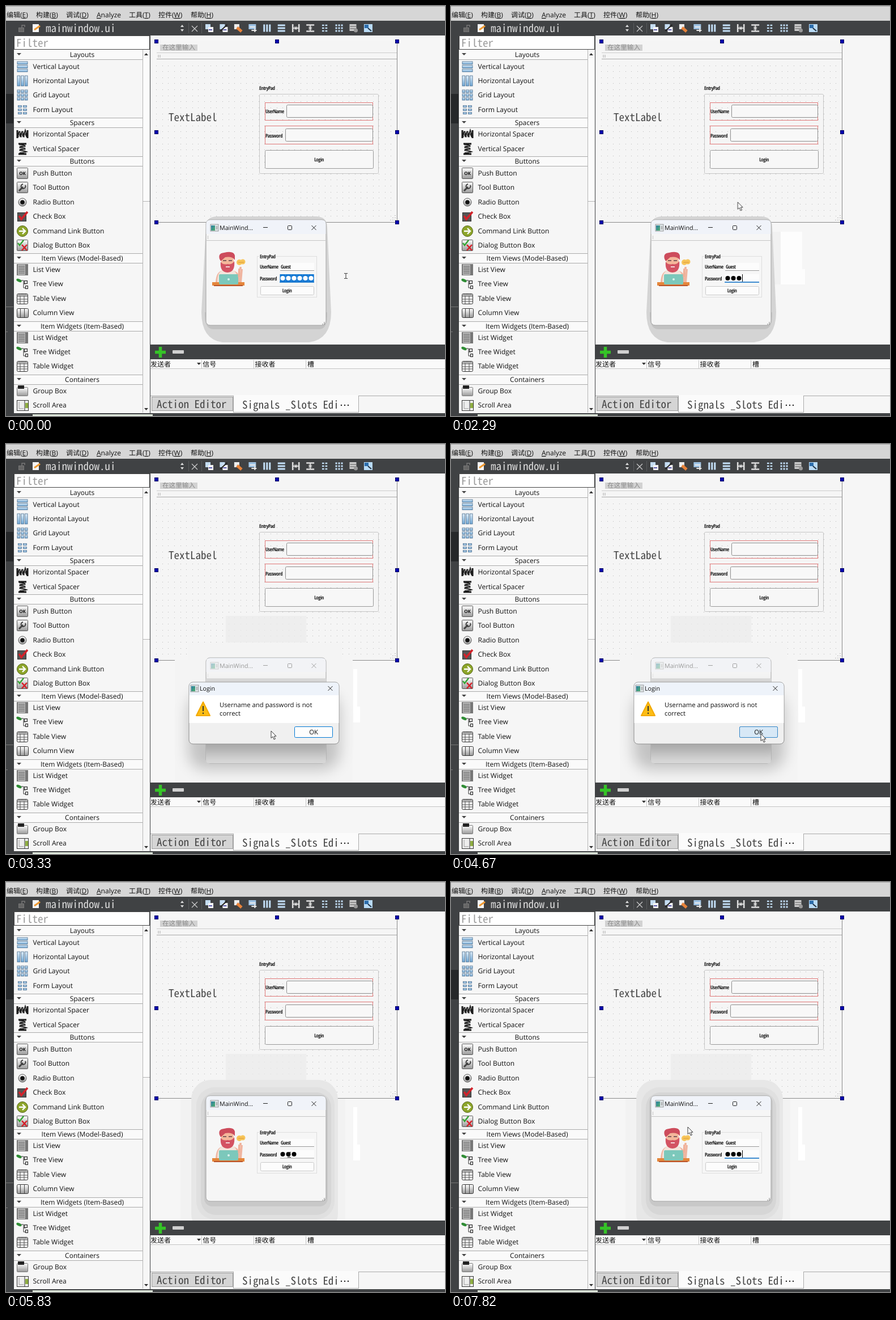
An HTML page that plays this animation: 775 by 723 pixels, repeating every 8000 ms.

```html
<!DOCTYPE html>
<html lang="zh">
<head>
<meta charset="utf-8">
<title>Login form demo</title>
<style>
html, body { margin: 0; width: 100%; height: 100%; overflow: hidden; background: #f6f6f6; }
svg { display: block; width: 775px; height: 723px; }
text { font: 12px "Open Sans", "Noto Sans CJK SC", "Noto Sans CJK", sans-serif; fill: #111; text-rendering: geometricPrecision; white-space: pre; }
text.mid { text-anchor: middle; }
text.mono { font: 19px "Noto Sans Mono CJK SC", "Liberation Mono", monospace; font-size-adjust: ch-width .5; fill: #444; }
text.narrow { font: 8px "Open Sans Condensed", "Noto Sans Condensed", "Liberation Sans Narrow", "Open Sans", Roboto, sans-serif; font-stretch: 62.5%; font-size-adjust: ch-width .524; letter-spacing: -.5px; fill: #222; }
text.title { font-size: 10.7px; }
text.message { font-size: 11.3px; }
.u { text-decoration: underline; }

.step, .ease { animation: 8s infinite; }
.step { animation-timing-function: step-end; }
.ease { animation-timing-function: linear; }
.all { animation-name: all; }
.caret { animation-name: caret; }
.dot1 { animation-name: dot1; }
.dot2 { animation-name: dot2; }
.dot3 { animation-name: dot3; }
.pick1 { animation-name: pick1; }
.pick2 { animation-name: pick2; }
.pick3 { animation-name: pick3; }
.focus { animation-name: focus; }
.hover { animation-name: hover; }
.default { animation-name: default-button; }
.tight { animation-name: tight; }
.soft { animation-name: soft; }
.dialog { animation-name: dialog; }
.popup { animation-name: popup; transform-origin: 455px 475px; }
.press { animation-name: press; }
.trail1 { animation-name: trail1; }
.trail2 { animation-name: trail2; }
.trail3 { animation-name: trail3; }
.trail4 { animation-name: trail4; }
.pointer { animation-name: pointer; }
.arrow { animation-name: arrow; }
.beam { animation-name: beam; }

@keyframes all { 0% { opacity: 1 } 5.25%, 100% { opacity: 0 } }
@keyframes caret {
  0% { opacity: 0 }
  5.25% { opacity: 1; transform: none }
  11.875% { opacity: 0 }
  12.875% { opacity: 1; transform: translateX(10px) }
  15.75% { opacity: 1; transform: translateX(20px) }
  18.25% { opacity: 1; transform: translateX(30px) }
  40% { opacity: 0 }
  82.875% { opacity: 1; transform: none }
  88.5% { opacity: 0 }
  92.875% { opacity: 1; transform: translateX(10px) }
  95.125% { opacity: 1; transform: translateX(20px) }
  97.75%, 100% { opacity: 1; transform: translateX(30px) }
}
@keyframes dot1 { 0%, 82.875% { opacity: 0 } 12.875%, 92.875%, 100% { opacity: 1 } }
@keyframes dot2 { 0%, 82.875% { opacity: 0 } 15.75%, 95.125%, 100% { opacity: 1 } }
@keyframes dot3 { 0%, 82.875% { opacity: 0 } 18.25%, 97.75%, 100% { opacity: 1 } }
@keyframes pick1 { 0%, 82.875%, 100% { opacity: 0 } 76% { opacity: 1 } }
@keyframes pick2 { 0%, 82.875%, 100% { opacity: 0 } 75.2% { opacity: 1 } }
@keyframes pick3 { 0%, 82.875%, 100% { opacity: 0 } 74.5% { opacity: 1 } }
@keyframes focus { 0%, 82.875%, 100% { opacity: 1 } 40% { opacity: 0 } }
@keyframes hover { 0%, 34.6% { opacity: 0 } 35.4%, 58% { opacity: 1 } 60%, 100% { opacity: 0 } }
@keyframes default-button { 0%, 57% { opacity: 0 } 58%, 65% { opacity: 1 } 67%, 100% { opacity: 0 } }
@keyframes tight { 0%, 38.25% { opacity: 1 } 41%, 100% { opacity: 0 } }
@keyframes soft { 0%, 58.75% { opacity: 0 } 60.6%, 100% { opacity: 1 } }
@keyframes dialog { 0%, 38.25% { opacity: 0 } 41%, 58.75% { opacity: 1 } 60.6%, 100% { opacity: 0 } }
@keyframes popup { 0%, 38.25% { transform: scale(.92) } 41%, 58.75% { transform: none } 60.6%, 100% { transform: scale(.94) } }
@keyframes press { 0% { opacity: 0 } 47%, 100% { opacity: 1 } }
@keyframes trail1 { 0% { opacity: 0 } 5.25% { opacity: 1 } 27%, 100% { opacity: 0 } }
@keyframes trail2 { 0% { opacity: 0 } 29.5%, 100% { opacity: 1 } }
@keyframes trail3 { 0% { opacity: 0 } 27% { opacity: 1 } 41%, 100% { opacity: 0 } }
@keyframes trail4 { 0% { opacity: 0 } 41%, 100% { opacity: 1 } }
@keyframes pointer {
  0%, 1.125% { transform: translate(600px, 476px) }
  6.25%, 25.75% { transform: translate(611px, 453px) }
  27% { transform: translate(602px, 405px) }
  28.5% { transform: translate(518px, 350px) }
  30% { transform: translate(389px, 304px) }
  31.8% { transform: translate(425px, 390px) }
  33.8% { transform: translate(452px, 478px) }
  35.625%, 44.875% { transform: translate(468px, 506px) }
  47.875%, 63.75% { transform: translate(547px, 511px) }
  64.875% { transform: translate(526px, 501px) }
  66.5% { transform: translate(490px, 485px) }
  69% { transform: translate(441px, 481px) }
  73.625%, 74% { transform: translate(511px, 481px) }
  77% { transform: translate(440px, 472px) }
  78.5% { transform: translate(416px, 471px) }
  80.5%, 82.5% { transform: translate(435px, 470px) }
  86.375%, 100% { transform: translate(418px, 432px) }
}
@keyframes arrow { 0%, 66.5% { opacity: 0 } 2.5%, 82.875%, 100% { opacity: 1 } }
@keyframes beam { 0%, 66.5% { opacity: 1 } 2.5%, 82.875%, 100% { opacity: 0 } }
</style>
</head>
<body>
<svg viewBox="0 0 775 723">
  <defs>
    <linearGradient id="metal" x2="0" y2="1"><stop stop-color="#fff"/><stop offset="1" stop-color="#999"/></linearGradient>
    <linearGradient id="sky" x2="0" y2="1"><stop stop-color="#e2f0fb"/><stop offset="1" stop-color="#6ea6d4"/></linearGradient>
    <linearGradient id="smear"><stop stop-color="#ececec"/><stop offset=".5" stop-color="#f3f3f3"/><stop offset=".53" stop-color="#fff"/></linearGradient>
    <linearGradient id="glass" x2="1" y2="1"><stop stop-color="#2d7fa8"/><stop offset="1" stop-color="#4fae6a"/></linearGradient>
    <filter id="blur" x="-30%" y="-40%" width="160%" height="180%"><feGaussianBlur stdDeviation="13"/></filter>
    <clipPath id="canvas"><rect x="255" y="52" width="520" height="545"/></clipPath>
    <clipPath id="pane"><rect x="353" y="402" width="212" height="161" rx="6"/></clipPath>
    <g id="badge"><rect width="14" height="12" fill="#dfe5e8" stroke="#777" stroke-width=".7"/><rect x="1" y="2" width="7" height="9" fill="url(#glass)"/><path d="M9.500 4h3M9.500 6h3M9.500 8h3" stroke="#888"/></g>
    <path id="close" d="M0 0l8 8M8 0l-8 8" fill="none" stroke="#222"/>
    <g id="picked"><rect x="-5" y="-7" width="10.200" height="14" fill="#1177d3"/><circle r="4" fill="#fff"/></g>
  </defs>

  <g id="base"></g>

  <g clip-path="url(#canvas)">
    <g class="step trail1"><rect x="545" y="452" width="80" height="40" fill="url(#smear)"/></g>
    <g class="step trail2"><rect x="388" y="303" width="142" height="70" fill="#ebebeb" opacity=".75"/></g>
    <g class="step trail3"><rect x="565" y="398" width="17" height="93" fill="#f1f1f1"/><path d="M582 398h38v66h5v27h-43z" fill="#fdfdfd"/></g>
    <g class="step trail4"><path d="M613 397h7v66h5v28h-12z" fill="#fff"/></g>

    <g class="ease tight">
      <path d="M353 388Q353 372 372 371H548Q566 372 567 388L574 540Q574 588 535 593H382Q345 588 345 540Z" fill="#d4d4d4"/>
      <path d="M351 540Q350 570 366 570H553Q568 570 567 540Z" fill="#c2c2c2"/>
    </g>
    <g class="ease soft">
      <rect x="308" y="382" width="291" height="220" fill="#f2f2f2"/>
      <rect x="327" y="349" width="259" height="270" rx="34" fill="#e7e7e7"/>
      <rect x="336" y="362" width="244" height="233" rx="32" fill="#e0e0e0"/>
      <rect x="344" y="371" width="230" height="216" rx="26" fill="#d6d6d6"/>
      <rect x="350" y="376" width="218" height="196" rx="14" fill="#c8c8c8"/>
    </g>
    <g class="ease dialog">
      <path d="M322 350H593V381H612V600H298V381H322Z" fill="#f4f4f4"/>
      <rect x="322" y="440" width="267" height="134" rx="30" filter="url(#blur)" opacity=".2"/>
    </g>
  </g>

  <g id="window"></g>
  <g id="password"></g>

  <g class="ease dialog">
    <rect x="354" y="379" width="210" height="35" fill="#f3f3f3" opacity=".6"/>
    <path d="M353 414H565V557Q565 563 559 563H359Q353 563 353 557Z" fill="#dcdcdc"/>
    <g clip-path="url(#pane)"><rect x="327" y="432" width="257" height="113" rx="10" filter="url(#blur)" opacity=".25"/></g>
    <g class="ease popup">
      <rect x="323" y="420" width="265" height="109" rx="7" fill="#f0f0f0" stroke="#8e8e8e"/>
      <path d="M323.500 443V427Q323.500 420.500 330 420.500H581Q587.500 420.500 587.500 427V443Z" fill="#eef3fa"/>
      <path d="M323.500 443H587.500V492H323.500Z" fill="#fff"/>
      <use href="#badge" x="326" y="425"/>
      <text class="title" x="342" y="435">Login</text>
      <use href="#close" x="568.500" y="427"/>
      <path d="M348 455L360 479H336Z" fill="#fdbd15" stroke="#f3a900" stroke-width="2" stroke-linejoin="round"/>
      <path d="M348 462v9M348 473.500v2.500" stroke="#333" stroke-width="2"/>
      <text class="message" x="377" y="464">Username and password is not</text>
      <text class="message" x="377" y="479">correct</text>
      <rect x="509.500" y="498.500" width="67" height="19" rx="2" fill="#fdfdfd" stroke="#0078d4"/>
      <rect class="step press" x="509.500" y="498.500" width="67" height="19" rx="2" fill="#d7e8f6" stroke="#3385c6"/>
      <text class="mid message" x="543" y="512">OK</text>
    </g>
  </g>

  <g class="ease pointer">
    <path class="step arrow" d="M0 0V12.500L3 10L5.200 15L7.400 14L5.200 9.200H9Z" fill="#fff" stroke="#222" stroke-width=".9"/>
    <path class="step beam" d="M-3 -4.500H-.8L0 -4L.8 -4.500H3M0 -4V4M-3 4.500H-.8L0 4L.8 4.500H3" fill="none" stroke="#333"/>
  </g>
</svg>
<script>
const DARK = '#404244';
const rect = (x, y, w, h, fill, more = '') => `<rect x="${x}" y="${y}" width="${w}" height="${h}" fill="${fill}" ${more}/>`;
const box = (x, y, w, h, stroke, fill = 'none', rx = 0) => rect(x + .5, y + .5, w, h, fill, `stroke="${stroke}" rx="${rx}"`);
const path = (d, stroke, width = 1, fill = 'none') => `<path d="${d}" stroke="${stroke}" stroke-width="${width}" fill="${fill}"/>`;
const disc = (x, y, r, fill, more = '') => `<circle cx="${x}" cy="${y}" r="${r}" fill="${fill}" ${more}/>`;
const text = (x, y, s, cls = '', more = '') => `<text x="${x}" y="${y}" class="${cls}" ${more}>${s}</text>`;
const at = (x, y, s) => `<g transform="translate(${x} ${y})">${s}</g>`;
const put = (id, parts) => document.getElementById(id).innerHTML = parts.flat().join('');

// A block of equal, spaced cells centred on the origin.
function cells(cols, rows, size, gap = 2, fill = 'url(#sky)', stroke = '#44698c') {
  const w = size / cols, h = size / rows;
  let out = '';
  for (let i = 0; i < cols * rows; i++) {
    const x = -size / 2 + i % cols * w, y = -size / 2 + Math.floor(i / cols) * h;
    out += rect(x + gap / 2, y + gap / 2, w - gap, h - gap, fill, `stroke="${stroke}" stroke-width=".8"`);
  }
  return out;
}

// Grid dots snapped to whole pixels.
function dots(left, top, right, bottom, pitch) {
  let d = '';
  for (let y = top; y < bottom; y += pitch) {
    for (let x = left; x < right; x += pitch) d += `M${Math.round(x)} ${Math.round(y) + .5}h1`;
  }
  return path(d, '#b5b5b5');
}

const frame = box(-10, -10, 19, 19, '#555', 'url(#metal)', 1);
const list = rect(-10, -10, 20, 20, '#777') + rect(-8, -9, 13, 18, '#bbb') + path('M-7 -6H4M-7 -3H4M-7 0H4M-7 3H4M-7 6H4', '#555');
const tree = path('M-4 -6H2V7H6M2 0H6', '#333') + box(3, -6, 5, 5, '#222', '#ddd') + box(5, 3, 4, 5, '#222', '#ddd')
  + '<ellipse cx="-6" cy="-6" rx="5" ry="2.500" fill="#2f8d35" transform="rotate(25 -6 -6)"/>';
const table = box(-10, -9, 19, 18, '#333', '#f4f4f4', 2) + path('M-10 -4H10M-10 1H10M-10 5H10M-4 -9V9M3 -9V9', '#555') + rect(-9, -8, 18, 3, '#aaa');
const spring = path('M-9 -7V7M9 -7V7M-8 5L-5 -5L-3 5L0 -5L2 5L5 -5L8 5', '#1c1c1c', 3) + path('M-7 4L-4 -4M-2 4L1 -4M3 4L6 -4', '#ccc', .8);
const icons = {
  'Vertical Layout': cells(1, 3, 20),
  'Horizontal Layout': cells(3, 1, 20),
  'Grid Layout': cells(3, 3, 20),
  'Form Layout': cells(2, 3, 18, 3),
  'Horizontal Spacer': spring,
  'Vertical Spacer': `<g transform="rotate(90)">${spring}</g>`,
  'Push Button': frame + text(0, 2.5, 'OK', 'mid', 'style="font-size:8px;font-weight:700"'),
  'Tool Button': frame + path('M-6 6L1 -1', '#444', 3) + path('M5 -4A4 4 0 1 1 1 -6', '#444', 2),
  'Radio Button': disc(0, 0, 7, 'url(#metal)', 'stroke="#555"') + disc(0, 0, 3.8, '#111'),
  'Check Box': box(-9, -7, 15, 15, '#333', '#555') + path('M-6 -1L-2 5L9 -8', '#d3222a', 3.5),
  'Command Link Button': disc(0, 0, 9.5, '#8da52a', 'stroke="#55651a"') + path('M-6 0H4M0 -5L5 0L0 5', '#fff', 2.4),
  'Dialog Button Box': frame + path('M-8 -4L-5 0L2 -9', '#35a535', 2.5) + path('M-1 -1L8 9M8 -1L-1 9', '#d6222a', 2.6),
  'List View': list, 'Tree View': tree, 'Table View': table,
  'Column View': box(-10, -8, 20, 16, '#333', 'url(#metal)', 2) + path('M-3.500 -8V8M3.500 -8V8', '#444'),
  'List Widget': list, 'Tree Widget': tree, 'Table Widget': table,
  'Group Box': box(-10, -7, 19, 15, '#777', 'url(#metal)', 1) + rect(-8, -10, 11, 6, '#222'),
  'Scroll Area': box(-10, -9, 20, 18, '#333', '#eee') + path('M4 -9V9', '#333') + path('M-6 -6V6H2', '#999') + rect(5, -4, 5, 9, '#8fae42'),
};
const rowY = [107, 132, 157, 183, 226, 252, 295, 320, 346, 371, 397, 422, 465, 490, 516, 541, 585, 610, 635, 679, 704];
const groups = { 'Layouts': 85, 'Spacers': 205, 'Buttons': 273, 'Item Views (Model-Based)': 444, 'Item Widgets (Item-Based)': 564, 'Containers': 658 };

const menu = [[1, '编辑', 'E'], [53, '构建', 'B'], [106, '调试', 'D'], [217, '工具', 'T'], [269, '控件', 'W'], [326, '帮助', 'H']]
  .map(([x, word, key]) => text(x, 20, `${word}(<tspan class="u">${key}</tspan>)`));

const light = (cols, rows, gap = 2) => cells(cols, rows, 15, gap, '#c3dff7', 'none');
const pair = rect(-7, -7, 9, 9, '#c4dcf2') + rect(-2, -2, 9, 9, '#f4f4f4') + path('M-1 3H5', '#55a', 2);
const split = path('M-5.500 -7V7M5.500 -7V7', '#ddd', 2.6) + path('M-5 0H5', '#ddd', 2) + path('M-2 -3L0 0L-2 3M2 -3L0 0L2 3', '#ddd', 1.2);
const tools = [
  pair, pair + path('M-6 5L6 -6', '#222', 2),
  rect(-7, -7, 9, 9, '#eee') + path('M-2 -1L6 6', '#e8833a', 5),
  rect(-7, -7, 13, 9, '#9fc3e4') + path('M-5 -2H5M-2 4H7M4 0V7', '#eee', 2),
  light(3, 1), light(1, 3), split, `<g transform="rotate(90)">${split}</g>`,
  `<g transform="scale(.75 1)">${light(2, 3, 2.6)}</g>`, light(3, 3),
  rect(-7, -7, 12, 12, '#ccc') + path('M-6 -3H5M-6 1H5', '#555') + disc(4, 4, 3.5, '#999'),
  rect(-7, -7, 15, 14, '#b9dbf6') + rect(-6, -6, 7, 6, '#2b6cab') + path('M0 0L6 5', '#234', 2),
].map((icon, i) => at(359 + i * 25.45, 39, icon));

const handles = [[265, 62], [478, 62], [690, 62], [265, 222], [690, 222], [265, 381], [478, 381], [690, 381]]
  .map(([x, y]) => box(x - 3, y - 3, 6, 6, '#000060', '#0000b0'));

put('base', [
  rect(0, 0, 775, 723, '#f6f6f6'), rect(0, 0, 775, 26, '#d6d6d6'), rect(0, 0, 775, 1, '#aaa'), menu,
  text(160, 20, '<tspan class="u">A</tspan>nalyze'),
  rect(0, 26, 775, 26, DARK), rect(0, 26, 14, 697, DARK), rect(0, 155, 13, 52, '#26282a'), path('M0 530.500H13M0 574.500H3', '#777'),
  box(22, 38, 9, 7, '#777', '#666') + path('M28 38V34H33V37', '#777', 1.5),
  rect(47, 32, 11, 14, '#f5f5f5') + path('M50 42L60 35', '#f09a31', 3),
  text(70, 46, 'mainwindow.ui', 'mono', 'style="fill:#ddd"'),
  path('M308 37L311 33L314 37ZM308 41L311 45L314 41Z', 'none', 0, '#ddd'),
  path('M328 35L338 45M338 35L328 45', '#ccc', 1.2), path('M322.500 30V48M345.500 30V48', '#5a5c5e'), tools,

  box(14, 52, 239, 24, '#444', '#fff'), text(18, 72, 'Filter', 'mono', 'style="fill:#999"'),
  Object.entries(groups).map(([name, y], i) => rect(14, y - 8, 227, 17, '#fafafa')
    + path(`M14 ${y + 9.5}H241` + (i ? `M14 ${y - 7.5}H241` : ''), '#aaa')
    + path(`M19 ${y - 2}H27L23 ${y + 2}Z`, 'none', 0, '#444') + text(134.5, y + 4.5, name, 'mid')),
  Object.entries(icons).map(([name, icon], i) => at(29, rowY[i], icon) + text(47.5, rowY[i] + 4, name)),
  path('M241.500 77V717M241 344.500H254', '#b5b5b5'), rect(242, 92, 11, 252, '#fbfbfb'),
  path('M244 87L247.500 83L251 87ZM244 709L247.500 713L251 709Z', 'none', 0, '#333'),
  path('M254.500 52V718', DARK),

  rect(265, 62, 425, 319, '#f5f5f5'), dots(265, 104.5, 690, 381, 10.625),
  rect(272, 68, 66, 11, '#d2d2d2'), text(276, 77, '在这里输入', '', 'style="font-size:11.6px;fill:#8a8a8a"'),
  path('M266 82.500H690', '#ccc'), path('M266 93.500H690', '#aaa'), path('M269 86V91M272 86V91', '#aaa'),
  path('M690.500 62V381M265 381.500H690', '#8a8a8a'),
  [0, 1, 2].map(i => path(`M${687 - i * 4} ${369 + i * 4}V378`, '#888').replace('<path', '<path stroke-dasharray="1 3"')),
  text(287, 203, 'TextLabel', 'mono'),
  text(447, 148, 'EntryPad', 'narrow'), box(447, 155, 210, 140, '#c5c5c5', 'none', 2),
  box(457, 170, 190, 31, '#e07878'), box(457, 211, 190, 32, '#e07878'),
  text(458, 189, 'UserName', 'narrow'), text(458, 231.5, 'Password', 'narrow'),
  box(495, 174, 152, 22, '#8e8e8e', '#f8f8f8', 2), box(493, 216, 154, 22, '#8e8e8e', '#f8f8f8', 2),
  box(457, 254, 191, 32, '#999', '#f7f7f7', 2), text(552.5, 274, 'Login', 'narrow mid'), handles,

  rect(255, 597, 520, 26, DARK), path('M272.500 601V620M263 610.500H282', '#35c427', 5.5), rect(294, 607, 20, 6, '#d0d0d0', 'rx="1"'),
  rect(255, 623, 520, 17, '#fafafa'), path('M255 639.500H775M345.500 624V639M437.500 624V639M529.500 624V639', '#c4c4c4'),
  path('M337 629H344L340.500 633Z', 'none', 0, '#333'),
  ['发送者', '信号', '接收者', '槽'].map((s, i) => text(255 + i * 92.3, 636, s)),
  path('M255 687.500H402M622 687.500H775', '#aaa'), box(257, 689, 143, 24, '#999', '#d5d5d5'),
  box(401, 687, 221, 29, '#aaa', '#fbfbfb'), rect(402, 686, 220, 3, '#fbfbfb'),
  text(266, 709, 'Action Editor', 'mono'), text(417, 710, 'Signals _Slots Edi', 'mono'),
  [592, 598, 604].map(x => disc(x, 704, 1.2, '#222')),
  rect(0, 718, 775, 5, DARK), rect(47, 720, 212, 3, '#dfe8dc'),
]);

const portrait = [
  rect(364, 487, 57, 6, '#e5873c') + rect(367, 492, 51, 2, '#b9552b'),
  path('M370 487Q371 467 384 466H399Q410 467 412 479L414 464H418L416 487Z', 'none', 0, '#f0b5a0'),
  path('M373 487Q373 467 384 466H400Q409 468 409 487Z', 'none', 0, '#f3e5dc'),
  '<ellipse cx="391" cy="451" rx="11" ry="13" fill="#f4b79b"/>',
  path('M377 446Q374 436 385 435Q402 431 404 440V448Q399 441 387 443L379 450Z', 'none', 0, '#cd4c5c'),
  path('M379 451Q383 457 391 455Q399 457 403 450Q405 469 391 470Q377 469 379 451Z', 'none', 0, '#d35363'),
  path('M383 449H389M393 449H399', '#594048', 1.4), path('M388 460H395', '#fff', 1.5),
  rect(376, 473, 34, 18, '#7cc8bb', 'rx="2"') + disc(393, 482, 2, '#d9f1ec'),
  path('M411 478L412 463M414 464V460', '#f0b098', 3.5),
  disc(412, 452, 5, '#f7c55a') + disc(418, 451, 4.5, '#f7c55a') + path('M410 452H420', '#d99736'),
];

put('window', [
  rect(353, 377, 212, 186, '#f6f6f6', 'rx="7" stroke="#a2a2a2"'),
  path('M353.500 402V384Q353.500 377.500 360 377.500H558Q564.500 377.500 564.500 384V402Z', 'none', 0, '#f0f3f9'),
  path('M354 413.500H564', '#c5c5c5'), path('M356.500 405V411', '#c5c5c5'),
  '<use href="#badge" x="361" y="385"/>', text(377, 395, 'MainWind...', 'title'),
  path('M454 390.500H462', '#222'), box(497, 387, 7, 7, '#222', 'none', 1), '<use href="#close" x="539.500" y="387"/>',
  portrait,
  box(443, 441, 105, 72, '#dedede'), rect(447, 437, 29, 9, '#f6f6f6'), text(448, 445, 'EntryPad', 'narrow'),
  text(448, 463, 'UserName', 'narrow'), text(448, 484, 'Password', 'narrow'),
  rect(484, 453, 60, 14, '#fcfcfc'), text(485, 462.5, 'Guest', 'narrow'), path('M484 466.500H544', '#999'),
  box(449, 494, 94, 15, '#cacaca', '#fcfcfc', 2),
  `<g class="ease default">${box(449, 494, 94, 15, '#5b8fb8', '#f4f8fb', 2)}</g>`,
  `<g class="ease hover">${box(449, 494, 94, 15, '#3f8fce', '#d9eaf7', 2)}</g>`,
  text(496, 505, 'Login', 'narrow mid'),
  path('M562 557V562M559 560V562', '#888'),
]);

const spots = [488.5, 498.5, 508.5, 518.5, 528.5, 538.5];
const picked = x => `<use href="#picked" x="${x}" y="480"/>`;
put('password', [
  rect(483, 473, 61, 14, '#fcfcfc'), path('M484 487H544', '#999'),
  `<g class="step focus">${path('M483 487H544', '#1177d3', 1.6)}</g>`,
  spots.slice(0, 3).map((x, i) => `<g class="step dot${i + 1}">${disc(x, 480, 4, '#000')}</g><g class="step pick${i + 1}">${picked(x)}</g>`),
  `<g class="step all">${spots.map(picked).join('')}</g>`,
  `<g class="step caret">${path('M484.500 473V486', '#000')}</g>`,
]);
</script>
</body>
</html>
```
